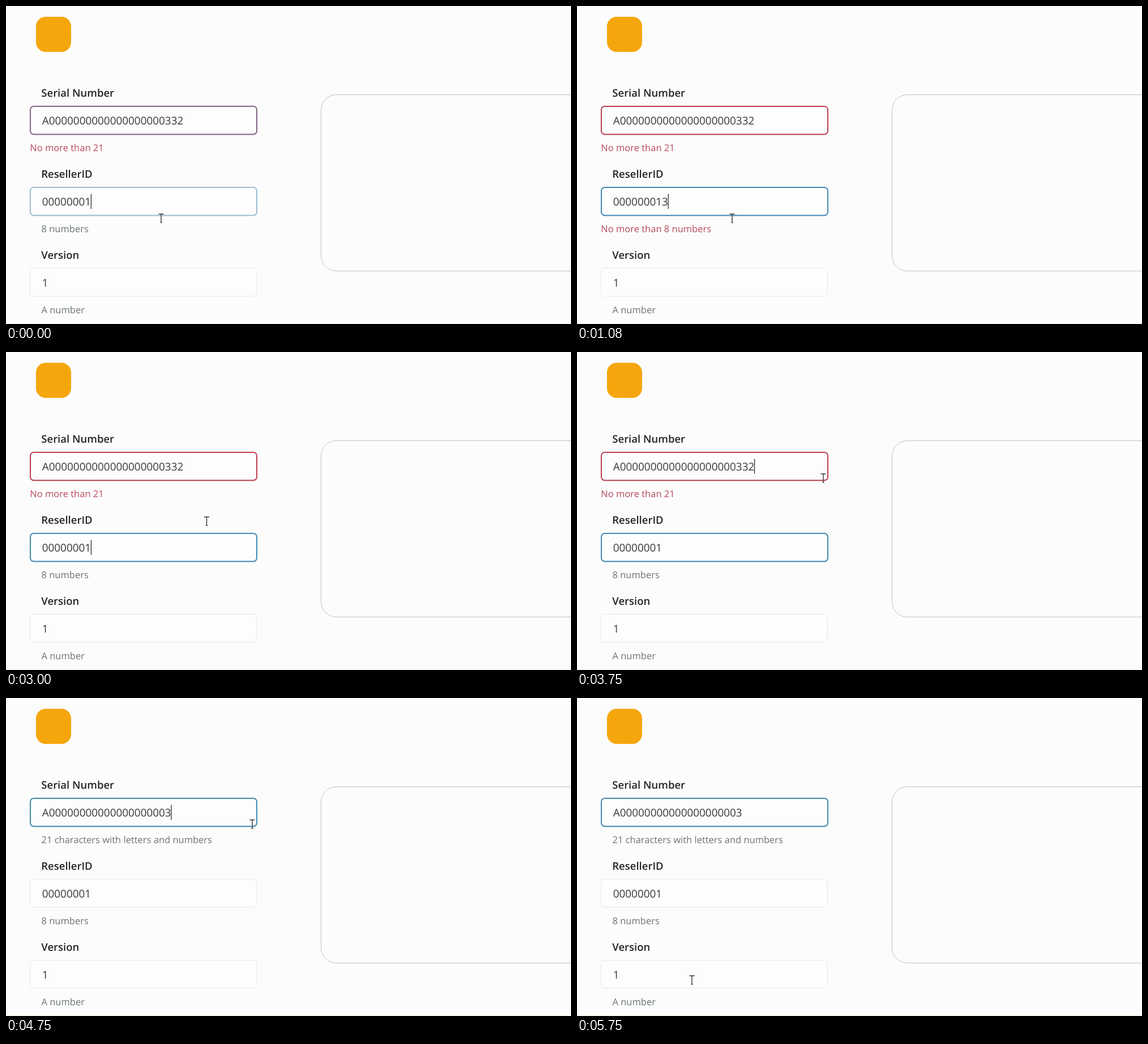
Recreate the animation shown at these times as an HTML page. Size 998 by 561 pixels, loop 5.83 s.

```html
<!DOCTYPE html>
<html lang="en">
<head>
<meta charset="utf-8">
<title>Form validation</title>
<style>
  html, body { margin: 0; width: 100%; height: 100%; overflow: hidden; background: #fcfcfc; }
  svg { display: block; width: 998px; height: 561px; }
  text { font-family: "Open Sans", "Noto Sans", sans-serif; text-rendering: geometricPrecision; white-space: pre; }
  .label { font-size: 18.5px; font-weight: 600; fill: #242428; }
  .value { font-size: 18.9px; fill: #38383c; }
  .hint { font-size: 16.5px; fill: #6a7375; }
  .hint.error { fill: #b84a5e; }
  .box { fill: #fdfdfd; stroke: #e6e8ee; }
  .ring { fill: none; stroke-width: 2; }
  .panel { fill: none; stroke: #bfc0ba; }
  .caret { stroke: #2c2c30; stroke-width: 1.3; }
  .pointer { fill: none; stroke: #38383a; stroke-width: 1.4; }
</style>
</head>
<body>
<svg id="stage" viewBox="0 0 998 561"></svg>
<script>
const LOOP = 5830, FPS = 12, FADE = 150, BLINK = 530;
const FOCUS_RESELLER = -75, FOCUS_SERIAL = 3750;
const BLUE = [66, 137, 178], RED = [190, 62, 80];
const VALUE_X = 63.7;
const stage = document.getElementById("stage");

function add(tag, attrs, text = "") {
  const el = document.createElementNS("http://www.w3.org/2000/svg", tag);
  for (const key in attrs) el.setAttribute(key, attrs[key]);
  el.textContent = text;
  stage.append(el);
  return el;
}

function addField(label, row) {
  const top = 143 * row;
  add("text", { class: "label", x: 62.3, y: 159.5 + top }, label);
  add("rect", { class: "box", x: 42.5, y: 176.5 + top, width: 400, height: 49.5, rx: 6 });
  return {
    top,
    ring: add("rect", { class: "ring", x: 43, y: 177 + top, width: 400, height: 49.5, rx: 6, opacity: 0 }),
    value: add("text", { class: "value", x: VALUE_X, y: 209.3 + top }),
    hint: add("text", { class: "hint", y: 255.5 + top })
  };
}

add("rect", { x: 53, y: 19, width: 62, height: 62, rx: 17, fill: "#f5a60c" });
add("rect", { class: "panel", x: 556.5, y: 156.5, width: 500, height: 311, rx: 27 });
add("path", { d: "M0 560.5H998", stroke: "#e3f8d6" });

const serial = addField("Serial Number", 0);
const reseller = addField("ResellerID", 1);
const version = addField("Version", 2);
const caret = add("path", { class: "caret", d: "M0 188.5V215" });
const pointer = add("path", { class: "pointer", d: "M-4.5 -7H4.5M0 -7V8M-1.5 8H1.5" });

// [time, value] steps; each edit also restarts the caret blink
const serialSteps = [
  [0, "A" + "0".repeat(19) + "332"],
  [4500, "A" + "0".repeat(19) + "33"],
  [4750, "A" + "0".repeat(19) + "3"]
];
const resellerSteps = [
  [0, "00000001"], [915, "000000013"], [1750, "0000000132"],
  [2330, "000000013"], [2750, "00000001"]
];
// [time, x, y]
const pointerPath = [
  [0, 274, 374], [2830, 274, 374], [3170, 435, 222],
  [5490, 435, 222], [5740, 203, 497], [LOOP, 203, 497]
];

const clamp = v => Math.min(1, Math.max(0, v));
const ease = v => v * v * (3 - 2 * v);
const mix = (a, b, k) => a + (b - a) * k;
const latest = (steps, t) => steps.filter(s => s[0] <= t).pop();

function setHint(field, text, error) {
  field.hint.textContent = text;
  field.hint.setAttribute("class", error ? "hint error" : "hint");
  field.hint.setAttribute("x", error ? 42.3 : 62.5);
}

function setRing(field, redness, opacity) {
  const rgb = BLUE.map((c, i) => Math.round(mix(c, RED[i], redness)));
  field.ring.setAttribute("stroke", `rgb(${rgb})`);
  field.ring.setAttribute("opacity", opacity);
}

function drawPointer(t) {
  const i = Math.max(1, pointerPath.findIndex(p => p[0] > t));
  const [t0, x0, y0] = pointerPath[i - 1], [t1, x1, y1] = pointerPath[i];
  const k = ease(clamp((t - t0) / (t1 - t0)));
  pointer.setAttribute("transform", `translate(${mix(x0, x1, k)} ${mix(y0, y1, k)})`);
}

function drawCaret(t, field, since) {
  const x = VALUE_X + field.value.getComputedTextLength() + 0.3;
  caret.setAttribute("transform", `translate(${x} ${field.top})`);
  caret.setAttribute("opacity", Math.floor((t - since) / BLINK) % 2 ? 0 : 1);
}

function draw(t) {
  const [serialTime, serialText] = latest(serialSteps, t);
  const [resellerTime, resellerText] = latest(resellerSteps, t);
  const toReseller = clamp((t - FOCUS_RESELLER) / FADE);
  const toSerial = clamp((t - FOCUS_SERIAL) / FADE);
  const serialLong = serialText.length > 21, resellerLong = resellerText.length > 8;

  serial.value.textContent = serialText;
  reseller.value.textContent = resellerText;
  setHint(serial, serialLong ? "No more than 21" : "21 characters with letters and numbers", serialLong);
  setHint(reseller, resellerLong ? "No more than 8 numbers" : "8 numbers", resellerLong);
  setRing(serial, toReseller - toSerial, 1);
  setRing(reseller, 0, toReseller - toSerial);

  if (t < FOCUS_SERIAL) drawCaret(t, reseller, resellerTime || FOCUS_RESELLER);
  else drawCaret(t, serial, Math.max(serialTime, FOCUS_SERIAL));
  drawPointer(t);
}

version.value.textContent = "1";
setHint(version, "A number", false);

const start = performance.now();
function tick() {
  const t = (performance.now() - start) % LOOP;
  draw(Math.floor((t + 4) * FPS / 1000) * 1000 / FPS);
  requestAnimationFrame(tick);
}
tick();
</script>
</body>
</html>
```
